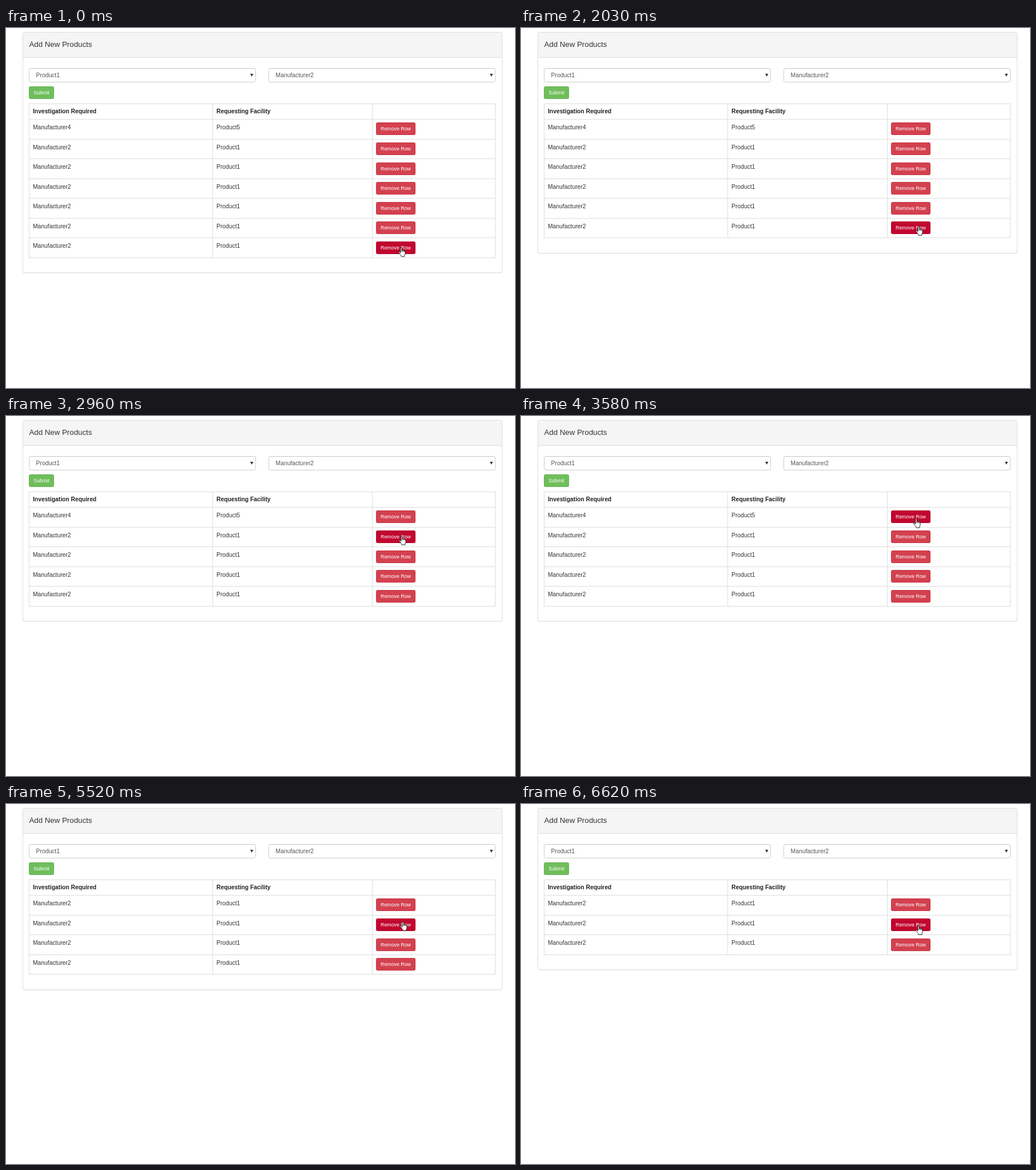
These frames come from a looping animation (890 by 629 pixels, 6.84 s). An HTML page:

```html
<!DOCTYPE html>
<html lang="en">
<head>
<meta charset="utf-8">
<title>Add New Products</title>
<style>
  html, body { margin: 0; width: 100%; height: 100%; overflow: hidden; background: #fff; }
  svg { display: block; }
  text { font: 10.32px "Liberation Sans", Arial, sans-serif; fill: #333; }
  .title { font-size: 13.27px; }
  .head { font-weight: bold; fill: #222; }
  .option { fill: #555; }
  .label { font-size: 8.84px; fill: #fff; text-anchor: middle; }
  .line { fill: none; stroke: #ddd; }
  .field { fill: #fff; stroke: #ccc; }
  .submit { fill: #6fbe5b; stroke: #62b34e; }
  .remove { fill: #d3414f; stroke: #c93444; }
  .remove.hover { fill: #c1062f; stroke: #b3052b; }
  .remove.active { fill: #a00a28; stroke: #8f0822; }
  .cursor path { fill: #fff; stroke: #111; stroke-width: 1.25; stroke-linejoin: round; }
  .cursor .folds { fill: none; }
</style>
</head>
<body>
<svg id="stage" width="890" height="629" viewBox="0 0 890 629"></svg>
<script>
const LOOP = 6840, PITCH = 34.57, MAX_ROWS = 7;
const stage = document.getElementById('stage');

function add(parent, tag, attrs, content) {
  const node = document.createElementNS('http://www.w3.org/2000/svg', tag);
  for (const key in attrs) node.setAttribute(key, attrs[key]);
  if (content) node.textContent = content;
  parent.appendChild(node);
  return node;
}
const write = (parent, cls, x, y, content) => add(parent, 'text', { class: cls, x, y }, content);
const box = (parent, cls, x, y, width, height, rx) => add(parent, 'rect',
  { class: cls, x: x + .5, y: y + .5, width: width - 1, height: height - 1, rx });

const lineY = i => Math.round(159 + PITCH * i);
const buttonY = i => Math.round(165.4 + PITCH * i);
const panelEnd = count => Math.round(428.4 - PITCH * (MAX_ROWS - count));

// Panel
const shadow = add(stage, 'rect', { x: 29, y: 8, width: 839, rx: 3, fill: '#000', opacity: .04 });
const panel = add(stage, 'rect', { x: 29.5, y: 7.5, width: 838, rx: 3, fill: '#fff', stroke: '#ddd' });
add(stage, 'path', { d: 'M30 51V10q0-2 2-2H865q2 0 2 2V51z', fill: '#f5f5f5' });
add(stage, 'path', { class: 'line', d: 'M30 51.5H867' });
write(stage, 'title', 40.5, 33, 'Add New Products');

// Form
[[40, 'Product1'], [459, 'Manufacturer2']].forEach(([x, name]) => {
  box(stage, 'field', x, 70, 397, 25, 3);
  add(stage, 'path', { d: `M${x + 2} 71.5h393`, stroke: '#000', opacity: .04 });
  write(stage, 'option', x + 12.6, 86, name);
  add(stage, 'path', { d: `M${x + 387} 80h5.4l-2.7 5z`, fill: '#333' });
});
box(stage, 'submit', 40, 102, 44, 22, 2);
write(stage, 'label', 62, 116, 'Submit');

// Table
const grid = add(stage, 'path', { class: 'line' });
write(stage, 'head', 47, 149, 'Investigation Required');
write(stage, 'head', 368, 149, 'Requesting Facility');
const rows = Array.from({ length: MAX_ROWS }, (_, i) => {
  const group = add(stage, 'g', {});
  const baseline = Math.round(177 + PITCH * i);
  const maker = write(group, '', 47, baseline, 'Manufacturer2');
  const product = write(group, '', 368, baseline, 'Product1');
  const button = box(group, 'remove', 647, buttonY(i), 69, 22, 2);
  write(group, 'label', 681.5, buttonY(i) + 14, 'Remove Row');
  return { group, maker, product, button };
});

// Pointer
const ring = add(stage, 'circle', { r: 8.5, fill: '#ff0', opacity: .5 });
const hand = add(stage, 'g', { class: 'cursor' });
add(hand, 'path', { d: 'M5.5 13.5V2a1.5 1.5 0 0 1 3 0v6a1.4 1.4 0 0 1 2.9 .5a1.4 1.4 0 0 1 2.7 .7' +
  'a1.3 1.3 0 0 1 2.4 1v5q0 2-1.5 4v2.8h-8v-2q-2-1.6-3.4-4.6L.9 12.4q-.4-1.7 1.1-1.9 1.3 0 2.1 1.3z' });
add(hand, 'path', { class: 'folds', d: 'M8.5 8v3M11.4 8.5v2.7M14.1 9.2v2.2' });
const arrow = add(stage, 'g', { class: 'cursor' });
add(arrow, 'path', { d: 'M.5 .5v16l3.7-3.6 2.4 5.6 2.3-1-2.4-5.5h5.3z' });

// Evenly timed samples of a slowing movement
function glide(start, end, count, [x0, y0], [x1, y1]) {
  return Array.from({ length: count }, (_, i) => {
    const ease = 1 - (1 - (i + 1) / count) ** 2;
    return [start + (end - start) * i / (count - 1), x0 + (x1 - x0) * ease, y0 + (y1 - y0) * ease];
  });
}

const moves = [
  [0, 691, 383],
  ...glide(1400, 2030, 9, [691, 383], [695, 346]),
  [2410, 695, 345], [2570, 694, 343], [2650, 692, 337],
  [2725, 692, 314], [2800, 692, 276], [2880, 692, 232],
  [2960, 692, 209], [3040, 693, 192],
  ...glide(3270, 3580, 5, [693, 192], [691, 179]),
  ...glide(5230, 5750, 8, [692, 185], [695, 212]),
  [6620, 695, 212]
];
const removals = [1240, 2490, 4670, 6380];
const FIRST_ROW_GONE = 4670;
const presses = [
  { from: 1020, to: 1090, dark: false },
  { from: 2260, to: 2335, dark: true },
  { from: 4460, to: 4520, dark: true },
  { from: 6150, to: 6220, dark: true }
];

const rowCount = t => MAX_ROWS - removals.filter(r => r <= t).length;

function hitRow(y, count) {
  for (let i = 0; i < count; i++) {
    if (y >= buttonY(i) && y < buttonY(i) + 22) return i;
  }
  return -1;
}

function stateAt(t) {
  const [moved, x, y] = moves.findLast(m => m[0] <= t + .5);
  const hit = hitRow(y, rowCount(moved));
  // The hover state drops on removal and returns with the next move.
  const stale = removals.some(r => r > moved && r <= t);
  return {
    x, y, count: rowCount(t),
    onButton: hit >= 0,
    hover: stale ? -1 : hit,
    press: presses.find(p => t >= p.from && t < p.to),
    firstKept: t < FIRST_ROW_GONE
  };
}

const show = (node, on) => node.setAttribute('display', on ? 'inline' : 'none');

function draw(s) {
  const end = panelEnd(s.count), bottom = lineY(s.count) + .5;
  panel.setAttribute('height', end - 8);
  shadow.setAttribute('height', end - 7);

  let d = 'M40 132.5H856';
  for (let i = 0; i <= s.count; i++) d += `M40 ${lineY(i) + .5}H856`;
  for (const x of [40.5, 361.5, 640.5, 855.5]) d += `M${x} 132V${bottom}`;
  grid.setAttribute('d', d);

  rows.forEach((row, i) => {
    show(row.group, i < s.count);
    const mode = i !== s.hover ? '' : s.press && s.press.dark ? ' active' : ' hover';
    row.button.setAttribute('class', 'remove' + mode);
  });
  rows[0].maker.textContent = s.firstKept ? 'Manufacturer4' : 'Manufacturer2';
  rows[0].product.textContent = s.firstKept ? 'Product5' : 'Product1';

  const x = Math.round(s.x), y = Math.round(s.y);
  show(ring, s.press);
  ring.setAttribute('cx', x - .5);
  ring.setAttribute('cy', y);
  show(hand, s.onButton);
  show(arrow, !s.onButton);
  hand.setAttribute('transform', `translate(${x} ${y}) scale(.737) translate(-7 0)`);
  arrow.setAttribute('transform', `translate(${x} ${y}) scale(.737)`);
}

const began = performance.now();
function tick() {
  draw(stateAt((performance.now() - began) % LOOP));
  requestAnimationFrame(tick);
}
tick();
</script>
</body>
</html>
```
